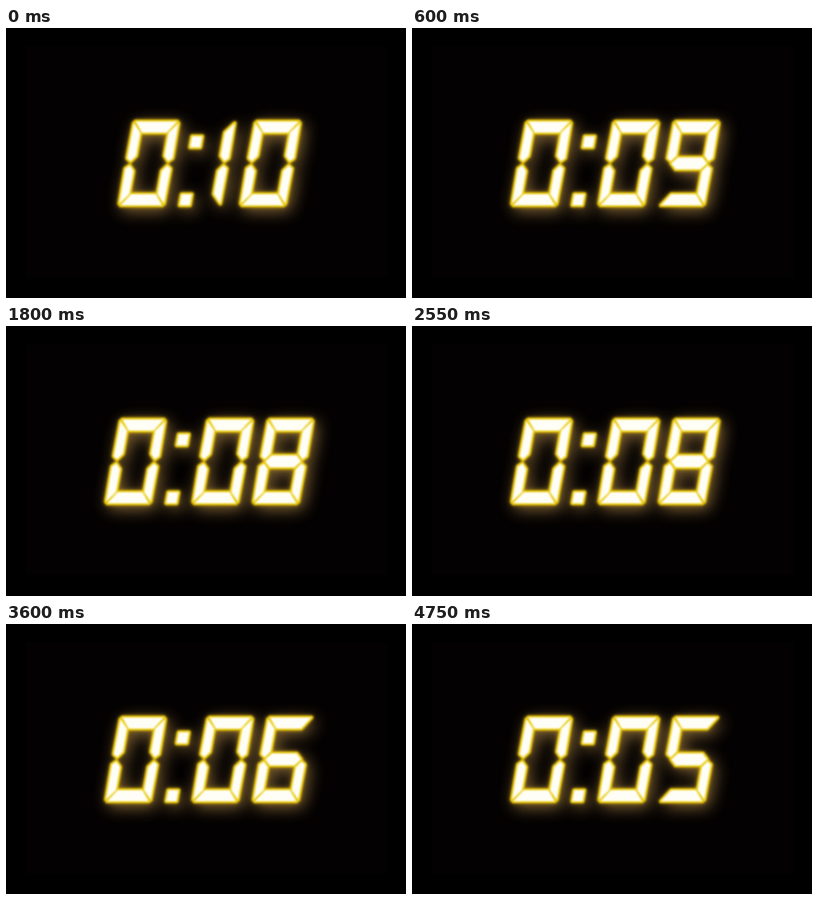
These frames come from a looping animation (500 by 338 pixels, 5050 ms). An HTML page:

```html
<!DOCTYPE html>
<html lang="en">
<head>
<meta charset="utf-8">
<title>Countdown</title>
<style>
  html, body { margin: 0; width: 100%; height: 100%; overflow: hidden; background: #000; }
  svg { display: block; width: 100vw; height: 100vh; }
</style>
</head>
<body>
<svg viewBox="0 0 500 338">
  <defs>
    <filter id="wide" filterUnits="userSpaceOnUse" x="0" y="0" width="500" height="338" color-interpolation-filters="sRGB">
      <feGaussianBlur stdDeviation="10"/>
      <feOffset dx="4" dy="5"/>
    </filter>
    <filter id="near" filterUnits="userSpaceOnUse" x="0" y="0" width="500" height="338" color-interpolation-filters="sRGB">
      <feGaussianBlur stdDeviation="2.6"/>
    </filter>
    <filter id="edge" filterUnits="userSpaceOnUse" x="0" y="0" width="500" height="338" color-interpolation-filters="sRGB">
      <feGaussianBlur stdDeviation="1.1"/>
    </filter>
    <filter id="core" filterUnits="userSpaceOnUse" x="0" y="0" width="500" height="338" color-interpolation-filters="sRGB">
      <feGaussianBlur stdDeviation="0.9"/>
    </filter>
  </defs>
  <rect width="500" height="338" fill="#000"/>
  <rect x="24" y="23" width="453" height="289" fill="#030101"/>
  <g stroke-linejoin="round">
    <path class="lit" fill="#a88244" stroke="#a88244" stroke-width="4" opacity="0.85" filter="url(#wide)"/>
    <path class="lit" fill="#d0a410" stroke="#d0a410" stroke-width="5" opacity="0.7" filter="url(#near)"/>
    <path class="lit" fill="#f0d000" stroke="#e8c808" stroke-width="4.6" filter="url(#edge)"/>
    <path class="lit" fill="#fffef6" filter="url(#core)"/>
  </g>
</svg>
<script>
const LOOP = 5050, FIRST = 600, SECOND = 1000;
const LEFT = 142.9, TOP = 117, SLANT = 0.18;
const W = 57, H = 105;

const mirror = pts => pts.map(([x, y]) => [W - x, y]);
const flip = pts => pts.map(([x, y]) => [x, H - y]);

// Segments a to g in upright coordinates
const a = [[2.5, 0], [54.5, 0], [44, 14], [13, 14]];
const f = [[0.5, 2], [11, 14], [11, 43], [5, 50], [0, 46]];
const b = mirror(f);
const g = [[6, 52.5], [13, 45], [44, 45], [51, 52.5], [44, 60], [13, 60]];
const segments = { a, b, c: flip(b), d: flip(a), e: flip(f), f, g };

const digits = {
  0: "abcdef", 1: "bc", 5: "acdfg", 6: "acdefg",
  7: "abc", 8: "abcdefg", 9: "abcdfg"
};

const polygon = (pts, dx) => "M" + pts.map(([x, y]) =>
  (LEFT + dx + x - SLANT * y).toFixed(2) + " " + (TOP + y)).join("L") + "Z";

const digit = (n, dx) => [...digits[n]].map(s => polygon(segments[s], dx)).join("");

const dot = (y, dx) => {
  const x = 76.2;
  return polygon([[x, y], [x + 13, y], [x + 13, y + 14], [x, y + 14]], dx);
};

function readout(sec) {
  const [start, tens, ones] = sec > 9 ? [16.7, 87, 168.5] : [0, 109, 184.5];
  return digit(0, start) + dot(18.5, start) + dot(91, start) +
    digit(Math.floor(sec / 10), tens) + digit(sec % 10, ones);
}

const layers = document.querySelectorAll(".lit");
let shown = -1;

function draw(now) {
  const t = now % LOOP;
  const sec = t < FIRST ? 10 : 9 - Math.floor((t - FIRST) / SECOND);
  if (sec !== shown) {
    shown = sec;
    const path = readout(sec);
    layers.forEach(p => p.setAttribute("d", path));
  }
}

function tick() {
  draw(performance.now());
  requestAnimationFrame(tick);
}
tick();
</script>
</body>
</html>
```
